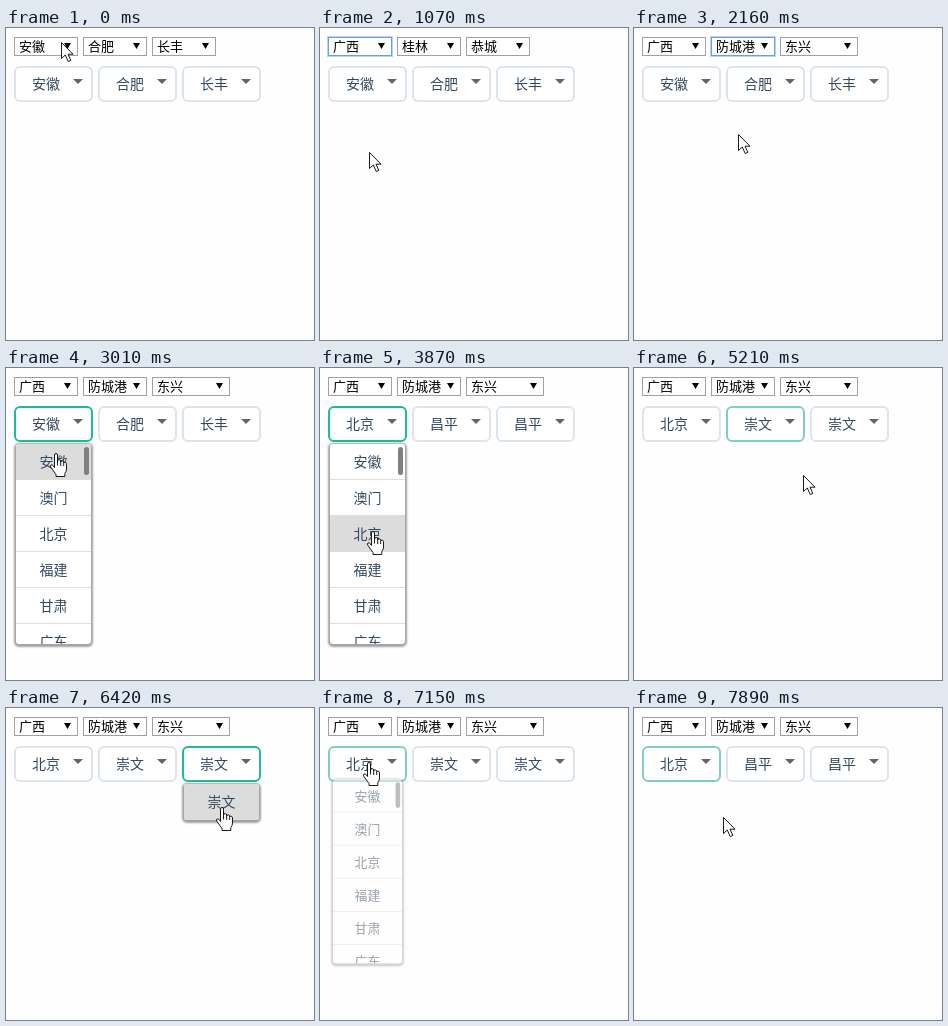
An HTML page for the animation above (8000 ms loop, 308 by 312 pixels).

```html
<!DOCTYPE html>
<html lang="zh-CN">
<head>
<meta charset="utf-8">
<style>
html, body { margin: 0; width: 100%; height: 100%; overflow: hidden; background: #fefefe; }
body { position: relative; font-family: "Noto Sans CJK SC", "Noto Sans CJK", sans-serif; }
div, svg { position: absolute; box-sizing: border-box; white-space: nowrap; }
.native { top: 9px; width: 64px; height: 19px; border: 1px solid #a0a0a0; background: #fff; color: #000;
  font-size: 13px; line-height: 16px; padding-left: 4px; }
.native.focus { border-color: #6f9be0; box-shadow: 0 0 0 1px #bcd2f5; }
.native::after { content: ""; position: absolute; right: 6px; top: 5px; width: 7px; height: 6px;
  background: #000; clip-path: polygon(0 0, 100% 0, 50% 100%); }
.menu { top: 28px; width: 64px; border: 1px solid #999; background: #fff; font-size: 13px; }
.menu div { position: static; height: 15px; line-height: 15px; padding-left: 4px; color: #000; }
.menu .on { background: #1e90ff; color: #fff; }
.pick { top: 38px; width: 79px; height: 36px; border: 2px solid #dce4ec; border-radius: 6px;
  background: #fff; color: #34495e; font-size: 14px; line-height: 31px; padding-left: 16px; }
.pick::after { content: ""; position: absolute; right: 8px; top: 11px;
  border: 5px solid transparent; border-top-color: #666; border-bottom: 0; }
.pick.open { border-color: #1abc9c; }
.pick.half { border-color: #7ecfc0; }
.list { top: 76px; width: 75px; max-height: 200px; border-radius: 3px; background: #fff; overflow: hidden;
  box-shadow: 0 1px 2px 2px rgba(0, 0, 0, .36); transform-origin: 50% 0; color: #34495e; font-size: 14px; }
.list.half { opacity: .5; transform: scale(.92) translateY(-5px); }
.list .row { position: static; height: 36px; line-height: 35px; text-align: center; border-bottom: 1px solid #ddd; }
.list .on { background: #dcdcdc; }
.list .bar { left: 68px; top: 3px; width: 5px; height: 28px; border-radius: 3px; background: #808080; }
svg { left: 0; top: 0; overflow: visible; }
</style>
</head>
<body>
<script>
const LOOP = 8000, TICK = 121.5, LEAD = 35;

const provinces = '安徽 澳门 北京 福建 甘肃 广东 广西 贵州 海南 河北 河南 黑龙江 湖北 湖南 吉林 江苏 江西 辽宁 内蒙古 宁夏'.split(' ');
const cities = '百色 北海 北流 崇左 东兴 防城港 桂林 桂平 河池 合山 贺州 来宾 柳州 南宁 钦州 玉林'.split(' ');
const districts = '昌平 朝阳 崇文 大兴 东城 房山'.split(' ');

// The session, counted in ticks: pointer moves and state changes
const moves = [], events = [];
const go = (from, to, x, y) => moves.push({ from, to, x, y });
const set = (tick, change) => events.push({ tick, change });
const goPick = (from, to, i) => go(from, to, 50 + 84 * i, 55);

set(0, { native: ['安徽', '合肥', '长丰'], pick: ['安徽', '合肥', '长丰'], focus: -1, menu: -1, list: -1 });
go(0, 0, 55, 14);

set(2, { menu: 0, focus: 0 });
go(2, 5, 49, 124);
set(9, { menu: -1, native: ['广西', '桂林', '恭城'] });
go(9, 12, 112, 19);
set(13, { menu: 1, focus: 1 });
go(13, 15, 117, 107);
set(16, { menu: -1, native: ['广西', '防城港', '东兴'], wide: true });
go(16, 18, 104, 106);

goPick(18, 20, 0);
set(22, { list: 0, focus: -1 });
go(23, 30, 54, 164);
set(32, { pick: ['北京', '昌平', '昌平'] });
set(33, { list: -1 });

goPick(32, 38, 1);
set(39, { list: 1 });
go(39, 41, 136, 160);
set(43, { list: -1, pick: ['北京', '崇文', '崇文'] });
go(42, 43, 169, 107);

goPick(43, 45, 2);
set(47, { list: 2 });
go(48, 50, 205, 153);
go(50, 53, 217, 100);
set(55, { list: -1 });

goPick(54, 56, 0);
set(59, { list: 0 });
go(59, 62, 54, 164);
set(65, { list: -1, pick: ['北京', '昌平', '昌平'] });
go(64, 65, 89, 109);

function stateAt(tick) {
  return Object.assign({}, ...events.filter(e => e.tick <= tick).map(e => e.change));
}
function pointerAt(tick) {
  let x = 0, y = 0;
  for (const m of moves) {
    if (m.from > tick) break;
    const p = m.to > m.from ? Math.min(1, (tick - m.from) / (m.to - m.from)) : 1;
    x += (m.x - x) * p;
    y += (m.y - y) * p;
  }
  return [Math.round(x), Math.round(y)];
}

function add(cls, left, parent = document.body, text = '') {
  const el = document.createElement('div');
  el.className = cls;
  el.textContent = text;
  if (left) el.style.left = left + 'px';
  parent.append(el);
  return el;
}
const three = [0, 1, 2];
const natives = three.map(i => add('native', 8 + 69 * i));
const picks = three.map(i => add('pick', 8 + 84 * i));
const menus = [provinces, cities].map((names, i) => {
  const el = add('menu', 8 + 69 * i);
  names.forEach(name => add('', 0, el, name));
  return el;
});
const lists = [provinces.slice(0, 6), districts, ['崇文']].map((names, i) => {
  const el = add('list', 10 + 84 * i);
  el.rows = names.map(name => add('row', 0, el, name));
  if (names.length > 1) add('bar', 0, el);
  return el;
});
document.body.insertAdjacentHTML('beforeend', `
<svg width="1" height="1" fill="#fff" stroke="#000" stroke-width=".9" stroke-linejoin="round">
  <path id="arrow" d="M.5 .5V16.5L4.3 13L7.2 19.5L9.8 18.4L7 12.2H12Z"/>
  <g id="hand">
    <path d="M-2.5 13.5V1Q-2.5 -.5 -1 -.5T.5 1V7Q.8 5.5 2.2 5.6T3.7 7V8Q4 6.6 5.3 6.8T6.7 8.2V9
      Q7 8 8.2 8.2T9.5 9.8V15Q9.5 17.5 7.8 19.5V22.5H-1V20.5L-6 13.5Q-7.2 11.6 -6 11T-3.6 11.8Z"/>
    <path d="M.5 7V11.5M3.7 8V12M6.7 9V12" fill="none"/>
  </g>
</svg>`);
const arrow = document.getElementById('arrow'), hand = document.getElementById('hand');

const show = (el, on) => { el.style.display = on ? '' : 'none'; };
const mark = (rows, n) => [...rows].forEach((row, i) => row.classList.toggle('on', i === n));

function draw(tick) {
  const now = stateAt(tick), before = stateAt(Math.max(0, tick - 1));
  const [x, y] = pointerAt(tick);

  natives.forEach((el, i) => {
    el.textContent = now.native[i];
    el.classList.toggle('focus', now.focus === i);
  });
  natives[2].style.width = now.wide ? '78px' : '';
  menus.forEach((el, i) => {
    const chosen = el.textContent && [...el.children].findIndex(c => c.textContent === now.native[i]);
    show(el, now.menu === i);
    mark(el.children, y < 29 ? chosen : Math.floor((y - 29) / 15));
  });

  let over = false;
  picks.forEach((el, i) => {
    const list = lists[i], open = now.list === i, half = open !== (before.list === i);
    const inside = x >= 8 + 84 * i && x < 87 + 84 * i;
    const row = inside && y >= 76 ? Math.floor((y - 76) / 36) : -1;
    el.textContent = now.pick[i];
    el.classList.toggle('open', open);
    el.classList.toggle('half', half);
    list.classList.toggle('half', half);
    show(list, open);
    mark(list.rows, row);
    over ||= inside && y >= 38 && y < 74 || open && row in list.rows;
  });

  show(hand, over);
  show(arrow, !over);
  (over ? hand : arrow).setAttribute('transform', `translate(${x} ${y})`);
}

let last = -1;
function frame() {
  const tick = Math.floor((performance.now() % LOOP + LEAD) / TICK);
  if (tick !== last) draw(last = tick);
  requestAnimationFrame(frame);
}
frame();
</script>
</body>
</html>
```
